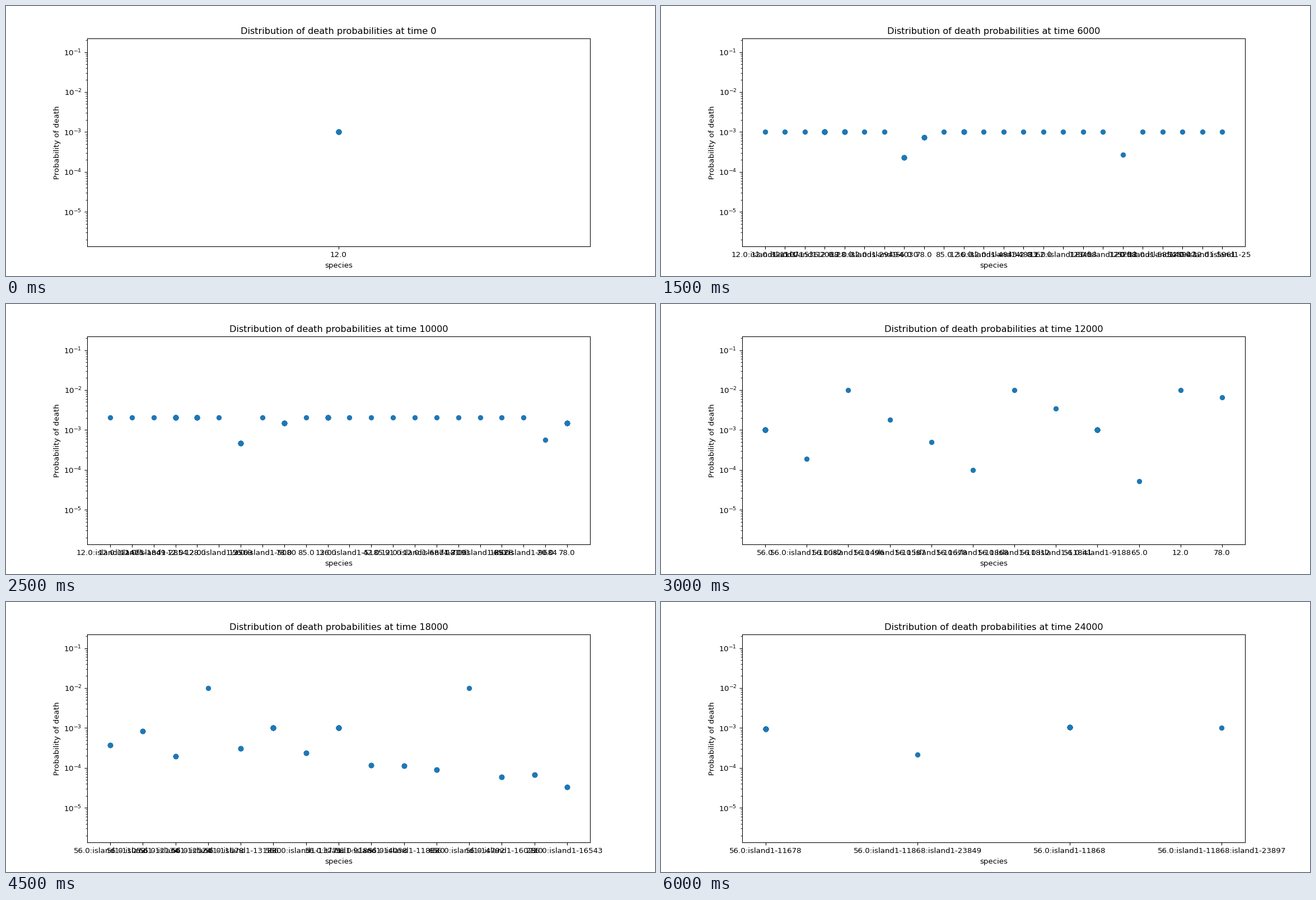
Write a matplotlib script that moves like this. It is 1159x483 px and loops after 6500 ms.

```python
import math
import random

import matplotlib.pyplot as plt
from matplotlib.animation import FuncAnimation

DPI = 96.6
WIDTH, HEIGHT = 1159, 483
STEP_YEARS = 2000
MANY = 40

# Species alive at each step; "*" is a lineage born on the island.
COMMUNITIES = [
    "12",
    "* * 12 * 62 78 56 36 * 28 * 81 * * * 12-25",
    "* 12 * * * * 40 78 62 56 36 28 81 * * * * 75 * 12-25",
    "* * * 12 28 * * 56 78 85 36 * * 42 62 * 81 * 20 * * 40 * 12-25",
    "* * * 12 28 * * 56 78 85 36 * * 42 91 * 85 * 20 * *",
    "* * * 12 28 * 56 * 78 85 36 * 42 91 * * 81 * 65 * 20 78",
    "56 * * * 56-11678 56-11868 * * 56-9188 65 12 78",
    "* * * 56-11678 * 56 56-11868 56-9188 65 * 12 * 78",
    "* * * 56-11678 * 56 * 56-9188 85 56-11868 65 * 82 *",
    "* * * 56-11678 * 56 * 56-9188 * 56-11868 65 * * 28 *",
    "56-11678 56-11868",
    "56-11678 56-11868 36 81",
    "56-11678 56-11868-23849 56-11868 56-11868-23897",
]
CALM_UNTIL, SETTLED_FROM = 5, 10
TRAITS = {"56": 0.65, "20": 0.57, "78": 0.14, "56-11868-23849": 0.67}
THRIVING = ("28", "36", "56", "78")


def species_at(step):
    keys = COMMUNITIES[step].split()
    root, earliest = ("12", 1000) if step <= CALM_UNTIL else ("56", 11000)
    years = range(earliest, max(earliest + 1, step * STEP_YEARS))
    births = iter(sorted(random.Random(step).sample(years, keys.count("*"))))
    return [f"{root}-{next(births)}" if key == "*" else key for key in keys]


def residents(step):
    if step <= CALM_UNTIL:
        return ["12"]
    if step < SETTLED_FROM:
        return ["56", "56-9188"]
    return ["56-11678", "56-11868"]


def death_level(step, slot, key):
    """Return -log10 of the probability of death."""
    if step <= CALM_UNTIL:
        return 3 - 0.04 * 8.0 ** (step - 4) + TRAITS.get(key, 0)
    if step >= SETTLED_FROM:
        if key in residents(step):
            sign = 1 if key == "56-11678" else -1
            return 3 + sign * 0.07 * 0.6 ** (step - SETTLED_FROM)
        return 3 + TRAITS.get(key, 0) if "-" in key else 2.0
    if key in residents(step):
        return 3.0
    if slot and (slot + step) % 4 == 0:  # poorly adapted newcomers
        return 2.0
    centre = 3.3 + 0.025 * slot * (step - 6)
    swing = 0.35 + 0.035 * slot * (8 - step)
    phase = (8 - step) / 2
    return centre + swing * math.cos(2 * math.pi * (slot - phase) * step / 24)


def population(step, key, level):
    """Overlapping markers give crowded species a heavier edge."""
    if key in residents(step):
        return MANY
    if step <= CALM_UNTIL:
        return 4 * step - 3 if key in THRIVING else 1
    if step < SETTLED_FROM and level > 2.5:
        return max(1, 2 * (step - 6))
    return 1


def full_name(key):
    root, *births = key.split("-")
    return ":island1-".join([root + ".0"] + births)


# The small excess keeps the truncated pixel size exact.
fig = plt.figure(figsize=((WIDTH + 0.01) / DPI, (HEIGHT + 0.01) / DPI), dpi=DPI)
ax = fig.add_subplot()


def draw(step):
    keys = species_at(step)
    last = len(keys) - 1
    ax.clear()
    ax.set_yscale("log")
    ax.set_ylim(10 ** -5.8643, 10 ** -0.6555)
    margin = 0.0501 * last + 0.0041
    ax.set_xlim(-margin, last + margin)
    for slot, key in enumerate(keys):
        level = death_level(step, slot, key)
        size = population(step, key, level)
        ax.scatter([slot] * size, [10 ** -level] * size, color="#1f77b4")
    ax.set_xticks(range(len(keys)), [full_name(key) for key in keys])
    ax.set_xlabel("species")
    ax.set_ylabel("Probability of death")
    ax.set_title(f"Distribution of death probabilities at time {step * STEP_YEARS}")


anim = FuncAnimation(fig, draw, frames=len(COMMUNITIES), interval=500, repeat=True)
plt.show()
```
